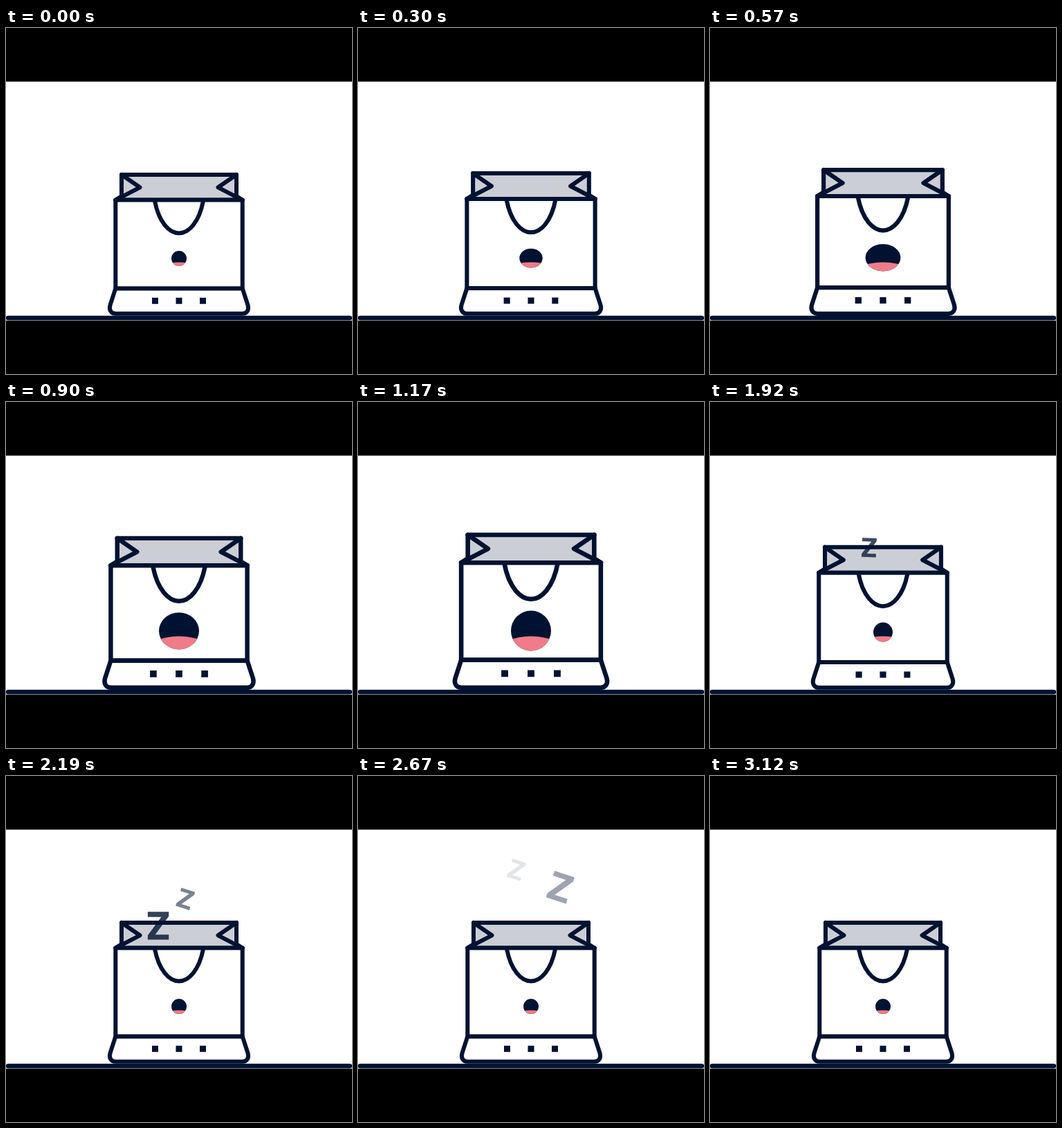
Write an HTML page that moves like this. It is 500 px wide and 500 px high and loops after 3540 ms.

```html
<!DOCTYPE html>
<html lang="en">
<head>
<meta charset="utf-8">
<title>Sleepy bag</title>
<style>
  html, body { margin: 0; width: 100%; height: 100%; overflow: hidden; background: #000; }
  svg { display: block; width: 100%; height: 100%; }
  .line { stroke: #001231; stroke-width: 6; stroke-linecap: round; stroke-linejoin: round; fill: none; }
  .white { fill: #fff; }
  .grey { fill: #cbced5; }
  .navy { fill: #001231; }
</style>
</head>
<body>
<svg viewBox="0 0 500 500">
  <defs>
    <path id="zed" class="navy" d="M-15.5-20.5H15.5V-14L-4.5 13H15.5V20.5H-15.5V14L4.5-13H-15.5Z"/>
    <clipPath id="lips"><ellipse class="mouth" cx="250"/></clipPath>
  </defs>
  <rect class="white" y="77.5" width="500" height="345.2"/>
  <path class="line" d="M3 419H497" style="stroke-width:6.5"/>

  <g class="bag">
    <path class="line grey" d="M158.3 248.6L167 243V212H333V243L341.7 248.6Z"/>
    <path class="line" d="M167 212L193.5 230.3L158.3 248.6M333 212L306.5 230.3L341.7 248.6"/>
  </g>

  <use class="zz" href="#zed"/>
  <use class="zz" href="#zed"/>

  <g class="bag">
    <path class="line white" d="M158.3 248.6H341.7V376.4H158.3Z"/>
    <path class="line" d="M215 250C221 281 236 296.5 250 296.5S279 281 285 250"/>
    <path class="line white" d="M158.3 376.4L150.5 400.5C148.5 407.5 152 412.8 158.5 412.8H341.5C348 412.8 351.5 407.5 349.5 400.5L341.7 376.4Z"/>
    <path class="navy" d="M211 389.7h9v9h-9zM245.5 389.7h9v9h-9zM280 389.7h9v9h-9z"/>
  </g>

  <ellipse class="mouth navy" cx="250"/>
  <ellipse cx="250" cy="363.6" rx="50" ry="25" fill="#f07c88" clip-path="url(#lips)"/>
</svg>
<script>
const LOOP = 3540, STEP = 30, LIFE = 1150;
const all = sel => [...document.querySelectorAll(sel)];
const bags = all('.bag'), mouths = all('.mouth');
const [small, big] = all('.zz');

const ramp = (t, a, b) => Math.min(1, Math.max(0, (t - a) / (b - a)));
const smooth = u => u * u * (3 - 2 * u);
const rise = (t, a, b) => smooth(ramp(t, a, b));

// cubic-bezier(x1, 0, x2, 1) solved by bisection
function ease(x, x1, x2) {
  let lo = 0, hi = 1;
  for (let i = 0; i < 24; i++) {
    const u = (lo + hi) / 2, v = 1 - u;
    if (3 * v * v * u * x1 + 3 * v * u * u * x2 + u * u * u < x) lo = u; else hi = u;
  }
  return smooth(lo);
}

// a letter slows as it climbs, sways, tips over and fades
function float(z, t, { born, x, drift, sway, size }) {
  const p = (t - born) / LIFE;
  z.style.display = p >= 0 && p < 1 ? '' : 'none';
  const left = x + drift * p - sway * Math.sin(7.6 * p);
  const top = 250.3 - 181 * p + 58.6 * p * p;
  const tilt = Math.min(18, 65 * p - 13);
  z.setAttribute('transform', `translate(${left} ${top}) rotate(${tilt}) scale(${size})`);
  z.setAttribute('opacity', Math.min(1, Math.max(0, 1 - p)));
}

function draw(t) {
  const shut = 1 - rise(t, 1490, 2070);
  const wide = rise(t, 0, 800) * shut;
  const tall = rise(t, 0, 1170) * shut;
  const swell = ease(ramp(t, 0, 1185), .45, .8) * (1 - rise(t, 1490, 2035));

  for (const bag of bags)
    bag.setAttribute('transform', `translate(250 412.8) scale(${1 + .1 * swell}) translate(-250 -412.8)`);

  for (const m of mouths) {
    m.setAttribute('rx', 11 + 18 * wide);
    m.setAttribute('ry', 11 + 18 * tall);
    m.setAttribute('cy', 333 - 2.5 * tall);
  }

  float(small, t, { born: 1645, x: 258, drift: -20, sway: 24, size: .67 });
  float(big, t, { born: 1960, x: 248, drift: 20, sway: 32, size: .98 });
}

const start = performance.now();
function tick() {
  const t = (performance.now() - start) % LOOP;
  draw(Math.floor(t / STEP) * STEP);
  requestAnimationFrame(tick);
}
draw(0);
requestAnimationFrame(tick);
</script>
</body>
</html>
```
